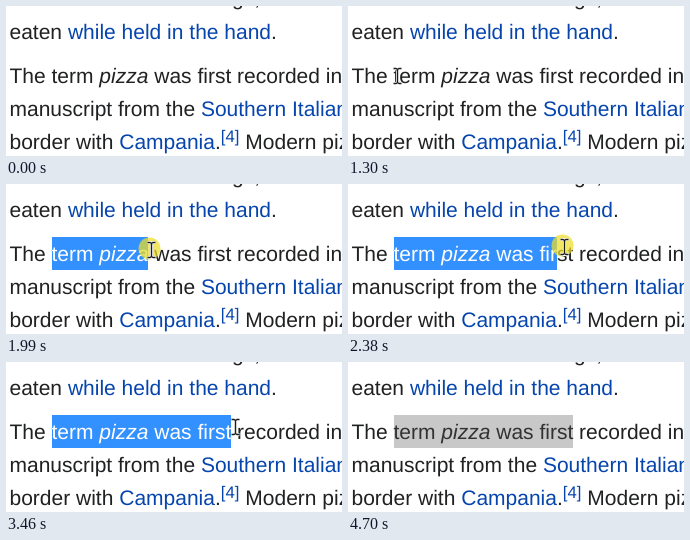
Animation of 336 by 150 pixels, one loop 4.77 s. Source, as an HTML page:

```html
<!DOCTYPE html>
<html lang="en">
<head>
<meta charset="utf-8">
<title>Selecting text</title>
<style>
  html, body { margin: 0; width: 100%; height: 100%; overflow: hidden; background: #fff; }
  svg { display: block; width: 336px; height: 150px; }
  text {
    font: 21px "Liberation Sans", Arial, sans-serif;
    fill: #202122;
    text-rendering: geometricPrecision;
    white-space: pre;
  }
  .link { fill: #0645ad; }
  .note { font-size: 16.8px; }
  .italic { font-style: italic; }
  #selection rect { fill: #3390ff; }
  #selection text { fill: #fff; }
  #selection.inactive rect { fill: #c8c8c8; }
  #selection.inactive text { fill: #323232; }
  #press { fill: #ecde28; fill-opacity: .72; }
  #cursor path { fill: none; stroke: #fff; stroke-width: 3; }
  #cursor path + path { stroke: #1c1c1c; stroke-width: 1.4; }
</style>
</head>
<body>
<svg viewBox="0 0 336 150">
  <defs>
    <clipPath id="range"><rect id="rangeBox" y="53" height="33"/></clipPath>
    <text id="line" x="3.5" y="77">The term <tspan class="italic">pizza</tspan> was first recorded in</text>
    <path id="beam" d="M-4-7.5h2.5L0-6.5L1.5-7.5H4M0-6.5V6.5M-4 7.5h2.5L0 6.5L1.5 7.5H4"/>
  </defs>

  <text x="226" y="-1">gs,</text>
  <text x="3.5" y="33">eaten <tspan class="link">while held in the hand</tspan>.</text>
  <text id="plain" x="3.5" y="77">The term <tspan class="italic">pizza</tspan> was first recorded in</text>
  <text x="3.5" y="110">manuscript from the <tspan class="link">Southern Italian</tspan></text>
  <text x="3.5" y="143">border with <tspan class="link">Campania</tspan>.<tspan class="link note" dy="-7">[4]</tspan><tspan dy="7"> Modern pizza</tspan></text>

  <g id="selection" clip-path="url(#range)">
    <rect y="53" width="336" height="33"/>
    <text x="3.5" y="77">The term <tspan class="italic">pizza</tspan> was first recorded in</text>
  </g>
  <circle id="press" r="11"/>
  <g id="cursor">
    <path d="M-4-7.5h2.5L0-6.5L1.5-7.5H4M0-6.5V6.5M-4 7.5h2.5L0 6.5L1.5 7.5H4"/>
    <path d="M-4-7.5h2.5L0-6.5L1.5-7.5H4M0-6.5V6.5M-4 7.5h2.5L0 6.5L1.5 7.5H4"/>
  </g>
</svg>
<script>
const LOOP = 4770;
const FIRST_CHAR = 4, LAST_CHAR = 23;

// Pointer path: [time, x, y]
const path = [
  [730, 74, 140], [900, 62, 104], [1070, 51, 71],
  [1299, 51, 71], [1300, 48.5, 70], [1500, 48.5, 70],
  [1580, 56, 69], [1990, 146, 66], [2020, 151, 65],
  [2380, 216, 62.5], [2530, 228, 64], [3450, 228, 64],
  [3620, 248, 82], [3980, 336, 160]
];
// Spans in which the screen is refreshed: [start, end, steps]
const bursts = [[730, 1070, 10], [1500, 2020, 16], [2050, 2530, 17], [3460, 3980, 17]];

const $ = id => document.getElementById(id);
const plain = $('plain'), rangeBox = $('rangeBox'), selection = $('selection');
const press = $('press'), cursor = $('cursor');
const show = (el, on) => el.setAttribute('visibility', on ? 'visible' : 'hidden');
const place = (el, x, y) => el.setAttribute('transform', `translate(${x} ${y})`);
const between = (t, a, b) => t >= a && t < b;

function quantise(t) {
  for (const [start, end, steps] of bursts) {
    if (between(t, start, end)) {
      const step = (end - start) / (steps - 1);
      return start + Math.floor((t - start) / step + 0.01) * step;
    }
  }
  return t;
}

function pointer(t) {
  const i = path.findIndex(p => p[0] > t);
  if (i < 0) return path[path.length - 1].slice(1);
  if (i === 0) return path[0].slice(1);
  const [t0, x0, y0] = path[i - 1], [t1, x1, y1] = path[i];
  const k = (t - t0) / (t1 - t0);
  return [x0 + (x1 - x0) * k, y0 + (y1 - y0) * k];
}

// Right edge of the last character whose middle the pointer has passed
function selectedEdge(x) {
  let edge = plain.getStartPositionOfChar(FIRST_CHAR).x;
  for (let i = FIRST_CHAR; i <= LAST_CHAR; i++) {
    const left = plain.getStartPositionOfChar(i).x;
    const right = plain.getEndPositionOfChar(i).x;
    if (x < (left + right) / 2) break;
    edge = right;
  }
  return edge;
}

function draw(time) {
  const t = quantise(time);
  const [x, y] = pointer(t);
  const px = Math.round(x) + 0.5, py = Math.round(y);
  place(cursor, px, py);
  place(press, px - 2, py - 1.5);
  show(cursor, between(t, 730, 3980));
  show(press, between(t, 1500, 2730));

  const selecting = t >= 1500;
  show(selection, selecting);
  if (selecting) {
    const left = Math.round(plain.getStartPositionOfChar(FIRST_CHAR).x);
    const lagged = t >= 2530 ? 336 : pointer(t - 32)[0];
    const right = Math.round(selectedEdge(lagged));
    rangeBox.setAttribute('x', left);
    rangeBox.setAttribute('width', Math.max(0, right - left));
  }
  selection.classList.toggle('inactive', t >= 4670);
}

function frame() {
  draw(performance.now() % LOOP);
  requestAnimationFrame(frame);
}
frame();
</script>
</body>
</html>
```
